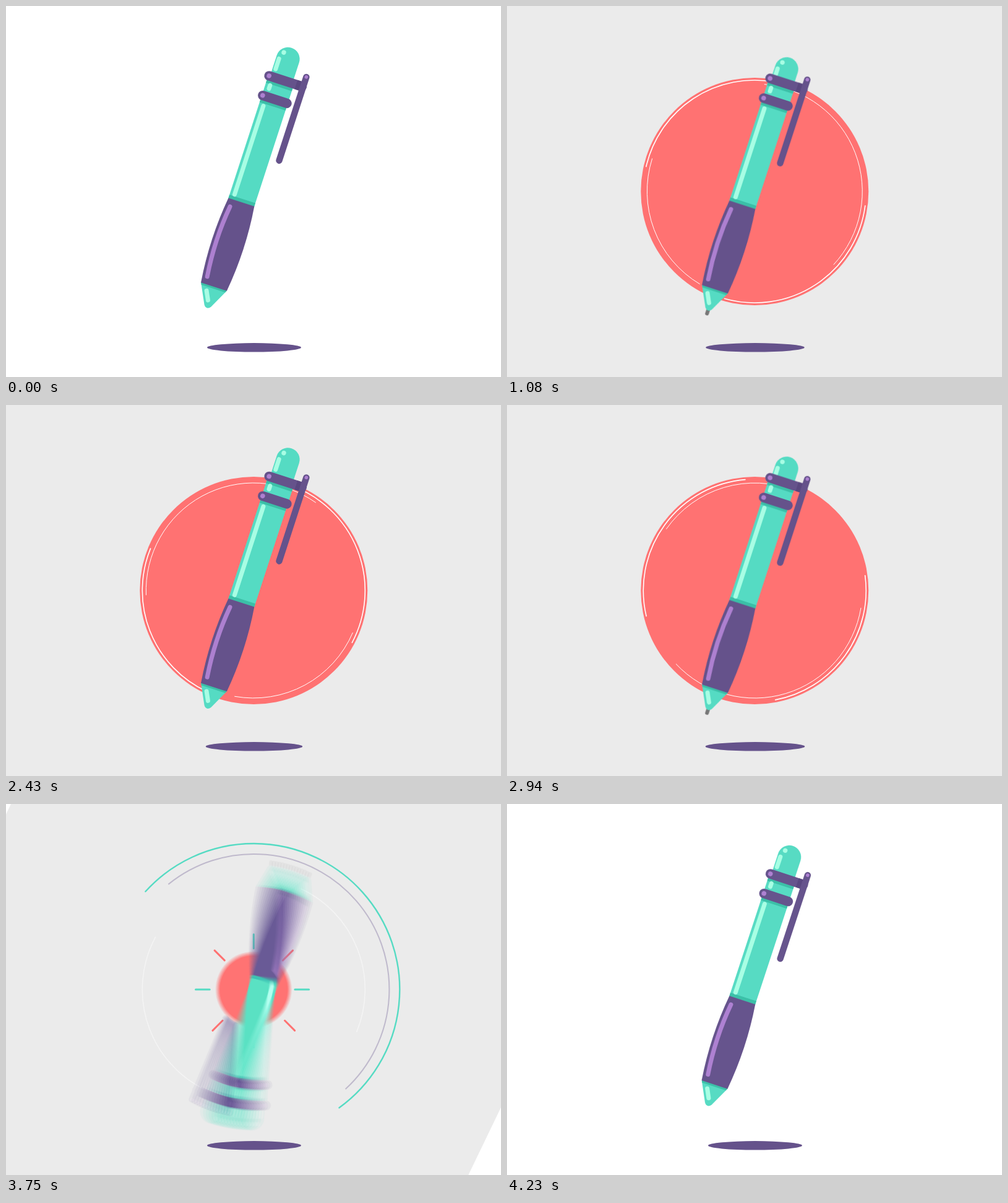
Write an HTML page that moves like this. It is 800 px wide and 600 px high and loops after 4260 ms.

```html
<!DOCTYPE html>
<html lang="en">
<head>
<meta charset="utf-8">
<title>Spinning pen</title>
<style>
  html, body { margin: 0; width: 100%; height: 100%; overflow: hidden; background: #fff; }
  svg { display: block; width: 800px; height: 600px; }
  .smear { isolation: isolate; }
  .smear use { mix-blend-mode: plus-lighter; }
  .teal { fill: #55dbc3; }
  .dark { fill: #3bbfa7; }
  .purple { fill: #65528b; }
  .lilac { fill: #ad80d0; }
  .shine { stroke: #a8fde4; stroke-width: 7; }
  .line { fill: none; stroke-linecap: round; }
</style>
</head>
<body>
<svg viewBox="0 0 800 600">
  <defs>
    <circle id="disc" r="184" fill="#ff7272"/>
    <g id="pen">
      <path id="lead" class="line" d="M-13.3 180V213" stroke="#777" stroke-width="6"/>
      <path class="teal" d="M-35.3 166H8.7L-7.6 198.6Q-10 202.3 -13.3 202.3T-19 198.6Z"/>
      <path class="dark" d="M-35.3 165H8.7L7 169.5H-33.6Z"/>
      <path class="line shine" d="M-22.6 176L-15.6 190"/>
      <g id="button">
        <path class="teal" d="M-32.3 -170V-221a19 19 0 0 1 38 0V-170Z"/>
        <circle cx="-22.9" cy="-229" r="3.7" fill="#a8fde4"/>
        <path class="line shine" d="M-27.2 -217V-199.5"/>
      </g>
      <path class="teal" d="M-35.3 -185H8.7V22.5H-35.3Z"/>
      <path class="dark" d="M-35.3 -180h44v6.5h-44ZM-35.3 -147h44v6.5h-44ZM-35.3 17h44v6h-44Z"/>
      <path class="line shine" d="M-27.6 -171.5V-166M-27.6 -136.5V14"/>
      <path class="purple" d="M-35.3 22.5H8.7Q17.8 94 8.7 166.3H-35.3Q-44.4 94 -35.3 22.5Z"/>
      <path class="line" d="M-28.6 35Q-36 94 -28.6 154" stroke="#ad80d0" stroke-width="7"/>
      <path class="line" d="M-33.9 -152.3H7.3M-33.9 -185.7H22" stroke="#65528b" stroke-width="15.5"/>
      <path d="M12 -193.4H20V-178H12Z" fill="#5a477f"/>
      <path class="line" d="M24 -202.4V-60.4" stroke="#65528b" stroke-width="10.4"/>
      <circle class="lilac" cx="-33.9" cy="-185.7" r="3.8"/>
      <circle class="lilac" cx="-33.9" cy="-152.3" r="3.8"/>
      <circle class="lilac" cx="24" cy="-202.4" r="2.8"/>
    </g>
  </defs>
  <rect id="sheet" x="-1" y="-1" width="2" height="2" fill="#ebebeb"/>
  <g id="discs" class="smear"></g>
  <g transform="translate(400.3 300)" class="line">
    <path id="outer" stroke="#fff" stroke-width="1.6"/>
    <path id="inner" stroke="#fff" stroke-width="1"/>
    <path id="sweepTeal" stroke="#55dbc3" stroke-width="2.4"/>
    <path id="sweepPurple" stroke="#65528b" stroke-width="2" opacity=".33"/>
    <path id="raysTeal" stroke="#55dbc3" stroke-width="3"/>
    <path id="raysCoral" stroke="#ff7272" stroke-width="3"/>
  </g>
  <ellipse id="shadow" class="purple" cx="401" cy="552.3" ry="7.2"/>
  <g id="pens" class="smear"></g>
</svg>
<script>
const LOOP = 4260, SHUTTER = 16.7, COPIES = 15;
const $ = id => document.getElementById(id);
const set = (id, name, value) => $(id).setAttribute(name, value);
const clamp = u => Math.min(1, Math.max(0, u));
const smooth = (t, from, to) => {
  const u = clamp((t - from) / (to - from));
  return u * u * (3 - 2 * u);
};

// cubic-bezier(.7, 0, .3, 1)
function steep(x) {
  let lo = 0, hi = 1;
  for (let i = 0; i < 30; i++) {
    const s = (lo + hi) / 2, r = 1 - s;
    if (2.1 * r * r * s + 0.9 * r * s * s + s * s * s < x) lo = s; else hi = s;
  }
  return lo * lo * (3 - 2 * lo);
}

const polar = (r, deg) => {
  const a = deg * Math.PI / 180;
  return (r * Math.sin(a)).toFixed(2) + ' ' + (-r * Math.cos(a)).toFixed(2);
};
// Clockwise arc, degrees measured from the top
const arc = (r, from, to) => to - from < 0.5 ? '' :
  `M${polar(r, from)}A${r} ${r} 0 ${to - from > 180 ? 1 : 0} 1 ${polar(r, to)}`;

for (const [group, shape] of [['discs', 'disc'], ['pens', 'pen']]) {
  for (let i = 0; i < COPIES; i++) {
    const copy = document.createElementNS('http://www.w3.org/2000/svg', 'use');
    copy.setAttribute('href', '#' + shape);
    $(group).append(copy);
  }
}

// Averages several poses across the shutter time
function smear(group, t, travel, pose) {
  const n = travel < 0.8 ? 1 : travel < 4 ? 3 : travel < 9 ? 5 : COPIES;
  [...$(group).children].forEach((copy, i) => {
    copy.style.display = i < n ? '' : 'none';
    if (i >= n) return;
    copy.style.opacity = 1 / n;
    copy.setAttribute('transform', pose(t + SHUTTER * ((i + 0.5) / n - 0.5)));
  });
}

const lift = t => t < 540 || t > 3580 ? 0 : 2.6 * (1 - Math.cos(Math.PI * (t - 540) / 760));
const angle = t => 18 - 360 * steep(clamp((t - 3237) / 1020));
const press = t => 12.6 * (smooth(t, 390, 540) - smooth(t, 1550, 1700)
  + smooth(t, 2480, 2650) - smooth(t, 3900, 4080));
const discScale = t => smooth(t, 100, 500) - smooth(t, 3420, 3950);
const drift = (t, speed, drag) => {
  const s = t - 2070;
  return speed * s - drag * s * s * s / 3;
};

function rays(t, first) {
  const head = 50 + 90 * smooth(t, 3600, 3930), tail = 50 + 90 * smooth(t, 3672, 3960);
  if (head - tail < 0.5) return '';
  let d = '';
  for (let a = first; a < 360; a += 90) {
    const lag = a > 90 && a < 300 ? 4.5 : 0;
    d += `M${polar(tail + lag, a)}L${polar(head + lag, a)}`;
  }
  return d;
}

function draw(t) {
  const shrink = smooth(t, 3300, 4220);
  const size = 900 * (smooth(t, 0, 520) - shrink);
  set('sheet', 'transform', `translate(382 291) rotate(${53 * shrink}) scale(${Math.max(0, size)})`);

  const growth = Math.abs(discScale(t + SHUTTER / 2) - discScale(t - SHUTTER / 2));
  smear('discs', t, growth * 184, s => `translate(400.3 300) scale(${Math.max(0, discScale(s))})`);

  const q = 562.5 + drift(t, 0.4935, 7.1e-8);
  const u = 240 - drift(t, 0.354, 6e-8);
  set('outer', 'd', arc(180, q, q + 98.4) + arc(180, q + 185.6, q + 272.6));
  set('inner', 'd', arc(174, u, u + 77) + arc(174, u + 154.5, u + 282));
  const appear = smooth(t, 300, 540);
  set('outer', 'opacity', appear * (1 - smooth(t, 3500, 3960)));
  set('inner', 'opacity', appear * (1 - smooth(t, 3450, 3740)));

  const head = -130 + 421 * smooth(t, 3480, 3930);
  const tail = -130 + 421 * smooth(t, 3621, 4080);
  set('sweepTeal', 'd', arc(236, tail, head));
  set('sweepPurple', 'd', arc(219, tail + 9, head - 7));
  set('raysTeal', 'd', rays(t, 0));
  set('raysCoral', 'd', rays(t, 45));

  set('shadow', 'rx', 76 + 0.9 * lift(t));
  const p = press(t);
  set('button', 'transform', `translate(0 ${p})`);
  set('lead', 'transform', `translate(0 ${p - 18})`);
  const turn = Math.abs(angle(t + SHUTTER / 2) - angle(t - SHUTTER / 2));
  smear('pens', t, turn * Math.PI / 180 * 230,
    s => `translate(400 ${300 + lift(s)}) rotate(${angle(s)})`);
}

let start;
function frame() {
  const now = performance.now();
  start ??= now;
  draw((now - start) % LOOP);
  requestAnimationFrame(frame);
}
frame();
</script>
</body>
</html>
```
